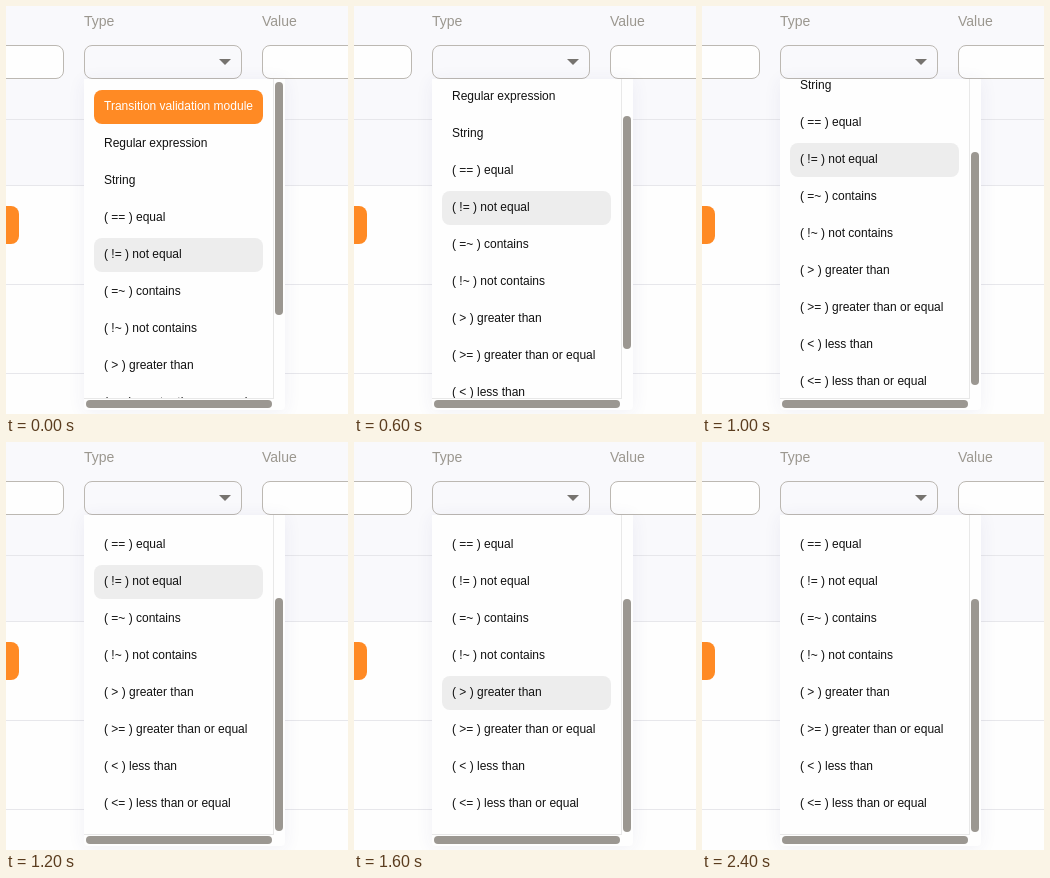
Animation, 342 px wide and 408 px high, one loop 2600 ms. Source, as an HTML page:

```html
<!DOCTYPE html>
<html lang="en">
<head>
<meta charset="utf-8">
<title>Type dropdown</title>
<style>
* { box-sizing: border-box; }
html, body { margin: 0; width: 100%; height: 100%; overflow: hidden; }
body { background: #fefefe; font: 12px "Liberation Sans", Arial, sans-serif; color: #111; }
#stage { position: relative; width: 342px; height: 408px; overflow: hidden; }
#stage div { position: absolute; }
.head { left: 0; top: 0; width: 342px; height: 180px; background: #f9f9fc; }
.line { left: 0; width: 342px; height: 1px; background: #e7e7eb; }
.label { top: 7px; font-size: 14px; line-height: 16px; color: #9b978f; }
.field { top: 39px; height: 34px; border: 1px solid #bcb8b2; border-radius: 8px; background: #fefefe; }
.arrow { left: 213px; top: 53px; border: 6px solid transparent; border-top-color: #76736f; border-bottom: 0; }
.button { left: -40px; top: 200px; width: 53px; height: 38px; border-radius: 8px; background: #ff8a24; }
.popup { left: 78px; top: 73px; width: 201px; height: 331px; background: #fefefe; border-radius: 0 0 4px 4px; box-shadow: 0 2px 18px rgba(50, 50, 130, .07); }
.view { left: 0; top: 0; width: 190px; height: 320px; overflow: hidden; border: solid #e8e8e8; border-width: 0 1px 1px 0; }
.item { left: 10px; width: 169px; height: 34px; padding-left: 10px; line-height: 32px; border-radius: 8px; white-space: pre; }
.item.hover { background: #ededed; }
.item.chosen { background: #ff8a24; color: #fff; }
.thumb { background: #9b9791; border-radius: 4px; }
#bar { left: 191px; width: 8px; height: 233px; }
</style>
</head>
<body>
<div id="stage">
  <div class="head"></div>
  <div class="line" style="top:113px"></div>
  <div class="line" style="top:179px"></div>
  <div class="line" style="top:278px"></div>
  <div class="line" style="top:367px"></div>
  <div class="label" style="left:78px">Type</div>
  <div class="label" style="left:256px">Value</div>
  <div class="field" style="left:-40px;width:98px"></div>
  <div class="field" style="left:78px;width:158px;background:#f9f9fc"></div>
  <div class="field" style="left:256px;width:120px"></div>
  <div class="arrow"></div>
  <div class="button"></div>
  <div class="popup">
    <div class="view"><div id="list"></div></div>
    <div class="thumb" id="bar"></div>
    <div class="thumb" style="left:2px;top:321px;width:186px;height:8px"></div>
  </div>
</div>
<script>
const LOOP = 2600, PITCH = 37;
const labels = ["Transition validation module", "Regular expression", "String",
  "( == ) equal", "( != ) not equal", "( =~ ) contains", "( !~ ) not contains",
  "( > ) greater than", "( >= ) greater than or equal", "( < ) less than",
  "( <= ) less than or equal"];

// start time, scroll offset, scrollbar top, hovered item
const steps = [
  [0, 0, 3, 4], [600, 47, 37, 4], [800, 86, 67, 4], [1000, 95, 73, 4],
  [1200, 109, 83, 4], [1400, 109, 84, 4], [1600, 109, 84, 7], [1800, 109, 84, -1]
];

const list = document.getElementById("list");
const bar = document.getElementById("bar");
const items = labels.map((text, i) => {
  const item = document.createElement("div");
  item.className = i ? "item" : "item chosen";
  item.style.top = 11 + PITCH * i + "px";
  item.textContent = text;
  list.append(item);
  return item;
});

function draw(now) {
  const t = now % LOOP;
  const [, scroll, barTop, hovered] = steps.findLast(step => step[0] <= t);
  list.style.top = -scroll + "px";
  bar.style.top = barTop + "px";
  items.forEach((item, i) => item.classList.toggle("hover", i === hovered));
}

const start = performance.now();
function tick() {
  draw(performance.now() - start);
  requestAnimationFrame(tick);
}
tick();
</script>
</body>
</html>
```
